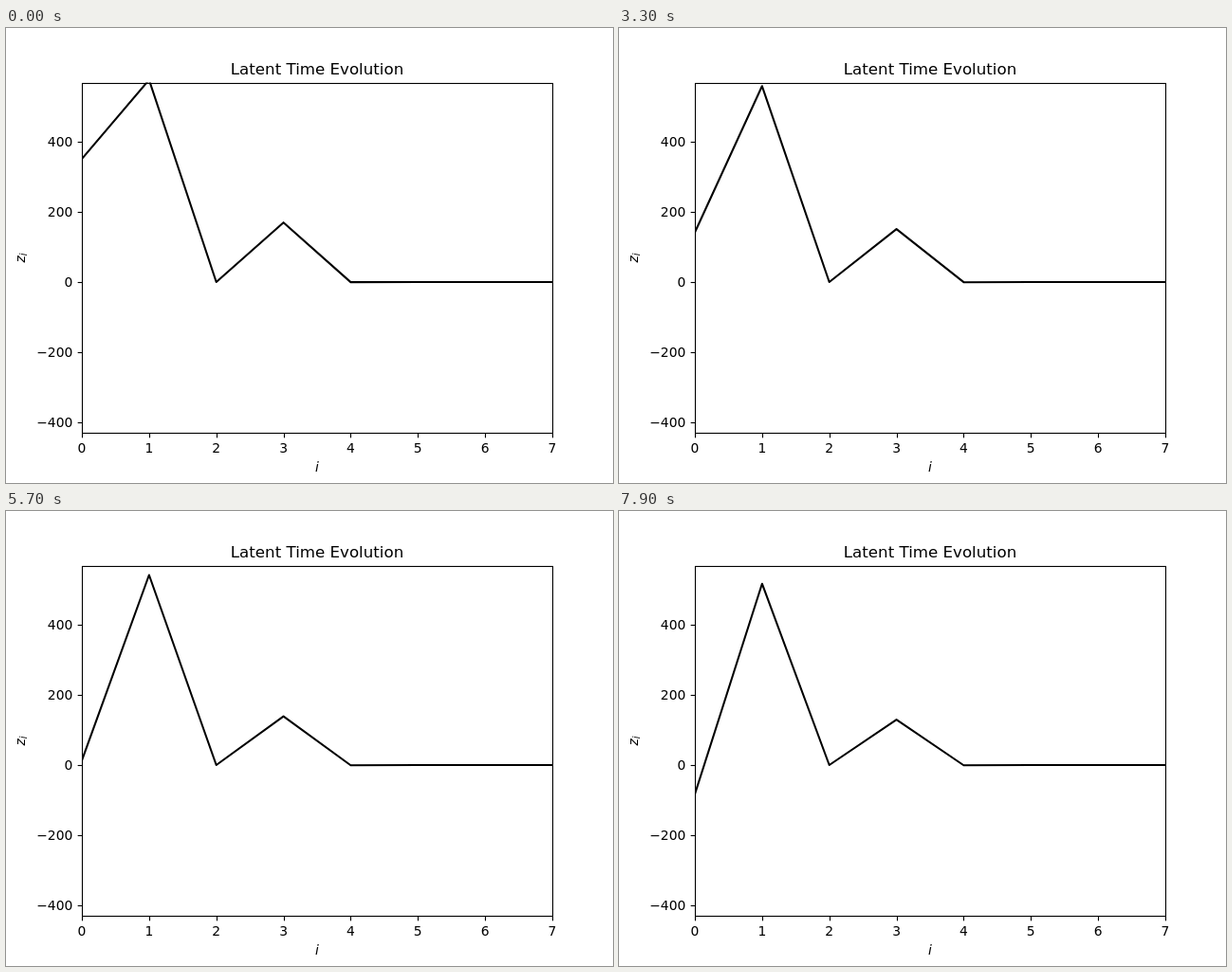
Animation, 640 px wide and 480 px high, one loop 8 s. Source, as an HTML page with a canvas:

```html
<!DOCTYPE html>
<html lang="en">
<head>
<meta charset="utf-8">
<title>Latent Time Evolution</title>
<style>
html, body { margin: 0; width: 100%; height: 100%; overflow: hidden; background: #fff; }
canvas { display: block; }
</style>
</head>
<body>
<canvas id="plot" width="640" height="480"></canvas>
<script>
const ctx = document.getElementById('plot').getContext('2d');
const LOOP = 8000, STEP = 100;
const L = 80, R = 576, T = 57.6, B = 427.2;
const ZERO = 268.05, UNIT = 0.3696, DX = (R - L) / 7;
const FONT = '"DejaVu Sans", Verdana, sans-serif';

// Vertical pixel positions of the moving points over time
const times = [0, 900, 2100, 3300, 4900, 6400, 7900];
const y0 = [138, 152.3, 184.5, 215.5, 248.5, 275, 298.8];
const y1 = [54.7, 56.9, 58.6, 61.3, 65.1, 70, 76.7];
const y3 = [205.2, 207.3, 209.6, 212.1, 215, 217.9, 220.1];

const slope = (ys, a, b) => (ys[b] - ys[a]) / (times[b] - times[a]);

// Smooth cubic through the keyed values
function curve(ys, t) {
  const last = times.length - 1;
  let k = 0;
  while (k < last - 1 && t > times[k + 1]) k++;
  const tangent = i => slope(ys, Math.max(0, i - 1), Math.min(last, i + 1));
  const h = times[k + 1] - times[k], u = (t - times[k]) / h, v = 1 - u;
  return v * v * (1 + 2 * u) * ys[k] + u * u * (3 - 2 * u) * ys[k + 1]
    + h * u * v * (v * tangent(k) - u * tangent(k + 1));
}

const snap = v => Math.round(v) + 0.5;

function segment(xa, ya, xb, yb) {
  ctx.beginPath();
  ctx.moveTo(xa, ya);
  ctx.lineTo(xb, yb);
  ctx.stroke();
}

function text(str, x, y, size, align, style = '') {
  ctx.font = `${style} ${size}px ${FONT}`;
  ctx.textAlign = align;
  ctx.fillText(str, x, y);
}

function drawAxes() {
  ctx.strokeStyle = ctx.fillStyle = '#000';
  ctx.lineWidth = 1.11;
  ctx.lineCap = 'butt';
  ctx.lineJoin = 'miter';
  ctx.strokeRect(snap(L), snap(T), R - L, snap(B) - snap(T));
  for (let i = 0; i <= 7; i++) {
    const x = L + i * DX;
    segment(snap(x), snap(B), snap(x), snap(B) + 4.86);
    text(String(i), x, 448, 13.89, 'center');
  }
  for (let v = -400; v <= 400; v += 200) {
    const y = ZERO - v * UNIT;
    segment(snap(L) - 4.86, snap(y), snap(L), snap(y));
    text(String(v).replace('-', '\u2212'), 70.3, Math.round(y) + 5, 13.89, 'right');
  }
  text('Latent Time Evolution', 328, 49, 16.67, 'center');
  text('i', 328, 468, 13.89, 'center', 'italic');

  ctx.save();
  ctx.translate(20, 247.6);
  ctx.rotate(-Math.PI / 2);
  text('z', 0, 0, 13.89, 'left', 'italic');
  text('i', 7.3, 2, 9.72, 'left', 'italic');
  ctx.restore();
}

function drawLine(t) {
  const ys = [curve(y0, t), curve(y1, t), 268, curve(y3, t),
    268.15 + 0.1 * t / LOOP, 268, 268.05, 268];
  ctx.save();
  ctx.beginPath();
  ctx.rect(L, T, R - L, B - T);
  ctx.clip();
  ctx.strokeStyle = '#000';
  ctx.lineWidth = 2.083;
  ctx.lineCap = 'square';
  ctx.lineJoin = 'round';
  ctx.beginPath();
  ys.forEach((y, i) => ctx.lineTo(L + i * DX, y));
  ctx.stroke();
  ctx.restore();
}

function draw(now) {
  const t = Math.floor((now % LOOP) / STEP) * STEP;
  ctx.fillStyle = '#fff';
  ctx.fillRect(0, 0, 640, 480);
  drawLine(t);
  drawAxes();
}

const start = performance.now();
function tick() {
  draw(performance.now() - start);
  requestAnimationFrame(tick);
}
tick();
</script>
</body>
</html>
```
